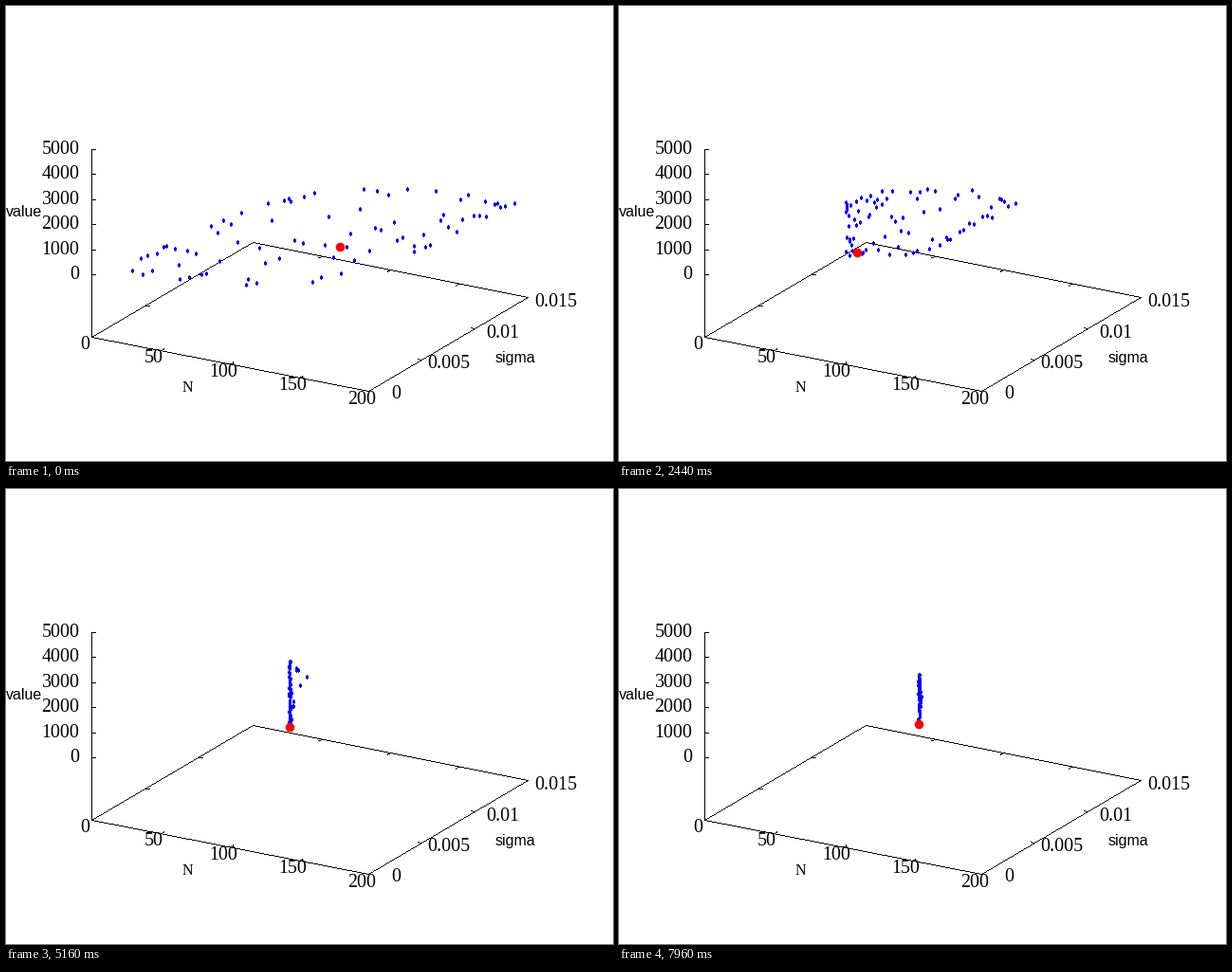
These frames come from a looping animation (640 px wide and 480 px high, 8000 ms). A matplotlib script:

```python
import numpy as np
import matplotlib.pyplot as plt
from matplotlib.animation import FuncAnimation
from matplotlib.path import Path

W, H, DPI = 640, 480, 100
STEP, FRAMES = 40, 200
COUNT = 80
PX = 72 / DPI  # one pixel in points

fig = plt.figure(figsize=(W / DPI, H / DPI), dpi=DPI, facecolor="white")
ax = fig.add_axes([0, 0, 1, 1])
ax.set_xlim(0, W)
ax.set_ylim(H, 0)
ax.axis("off")

# ---- axes box -------------------------------------------------------------
LEFT, FRONT, RIGHT, BACK = map(np.array, ([90, 350], [382, 407], [550, 308], [260, 250]))


def line(a, b):
    """One-pixel stepped line, drawn pixel by pixel."""
    n = int(np.ceil(np.abs(np.subtract(b, a)).max())) + 1
    pts = np.round(np.linspace(a, b, n))
    ax.plot(pts[:, 0], pts[:, 1], ",", color="black")


def label(x, y, text, ha="center", size=20, font="Liberation Serif"):
    ax.text(x, y, text, fontsize=size * PX, family=font, color="black",
            ha=ha, va="baseline")


for a, b in ((LEFT, FRONT), (FRONT, RIGHT), (RIGHT, BACK), (BACK, LEFT), (LEFT, (90, 152))):
    line(a, b)

# ticks point inwards along the other base axis
deep, wide = np.array([3.4, -2]), np.array([4, .8])
for k in range(1, 4):
    p, q = LEFT + k / 4 * (FRONT - LEFT), BACK + k / 4 * (RIGHT - BACK)
    line(p, p + deep)
    line(q, q - deep)
for k in range(1, 3):
    p, q = LEFT + k / 3 * (BACK - LEFT), FRONT + k / 3 * (RIGHT - FRONT)
    line(p, p + wide)
    line(q, q - wide)

for k in range(6):
    row = round(152 + 26.4 * k)
    line((90, row), (94, row))
    label(77.5, row + 4, str(5000 - 1000 * k), "right")
for k in range(5):
    label(83 + 73 * k, 362 + 14.4 * k, str(50 * k))
for k in range(4):
    label(411 + 56.2 * k, 414.5 - 32.5 * k, f"{.005 * k:g}")
label(186, 407, "N", "left", 16)
label(0, 222, "value", "left", 16, "Liberation Sans")
label(516, 376, "sigma", "left", 16, "Liberation Sans")

# ---- swarm ----------------------------------------------------------------
# Shape of the cloud over time: x range, crowding to the left, middle height at
# both ends, half thickness at the ends, extra thickness halfway, best point.
KEYS = np.array([
    # time  x0   x1  skew  y0   y1  edge bulge best
    [0,    133, 535, 1.0, 276, 208, 6, 44, 352, 254],
    [840,  176, 485, 1.1, 258, 206, 12, 36, 232, 275],
    [1800, 225, 444, 1.3, 246, 205, 22, 28, 240, 260],
    [3080, 254, 391, 2.6, 225, 211, 34, 12, 262, 260],
    [5160, 299, 316, 20, 215, 198, 33, 0, 299, 251],
    [6880, 307, 309, 2.0, 220, 220, 29, 0, 308, 252],
    [7960, 316, 318, 2.0, 219, 219, 25, 0, 316, 248]])

rng = np.random.default_rng(12)
rank = (np.arange(COUNT) + rng.random(COUNT)) / COUNT
rank[[0, -1]] = 0, 1
phase = rng.uniform(0, 2 * np.pi, COUNT)
rate = rng.uniform(-.5, .5, COUNT)
shake = rng.uniform(-1, 1, COUNT)

# 3 x 5 pixel dot with its corners cut; the tiny shift keeps pixel rounding stable
SHIFT = .02
outline = [(-.5, -2.5), (.5, -2.5), (.5, -1.5), (1.5, -1.5), (1.5, 1.5), (.5, 1.5),
           (.5, 2.5), (-.5, 2.5), (-.5, 1.5), (-1.5, 1.5), (-1.5, -1.5), (-.5, -1.5),
           (-.5, -2.5)]
DOT = Path(np.array(outline) + (SHIFT, -SHIFT), closed=True)
swarm, = ax.plot([], [], ls="none", marker=DOT, ms=(5 + 2 * SHIFT) * PX, mew=0,
                 color="#0000ff", antialiased=False, zorder=5)
best, = ax.plot([], [], ls="none", marker="o", ms=9.6 * PX, mew=0, color="#ff0000", zorder=6)


def draw(i):
    t = i * STEP
    x0, x1, skew, y0, y1, edge, bulge, bx, by = (
        np.interp(t, KEYS[:, 0], col) for col in KEYS.T[1:])
    s = rank ** skew
    x = x0 + (x1 - x0) * s + .7 * shake
    height = np.sin(phase + rate * t / 1000)
    y = y0 + (y1 - y0) * s + height * (edge * (1 - s) + bulge * np.sin(np.pi * s))
    swarm.set_data(np.round(x), np.round(y))
    best.set_data([bx], [by])
    return swarm, best


anim = FuncAnimation(fig, draw, frames=FRAMES, interval=STEP, repeat=True,
                     repeat_delay=0, blit=False)
plt.show()
```
